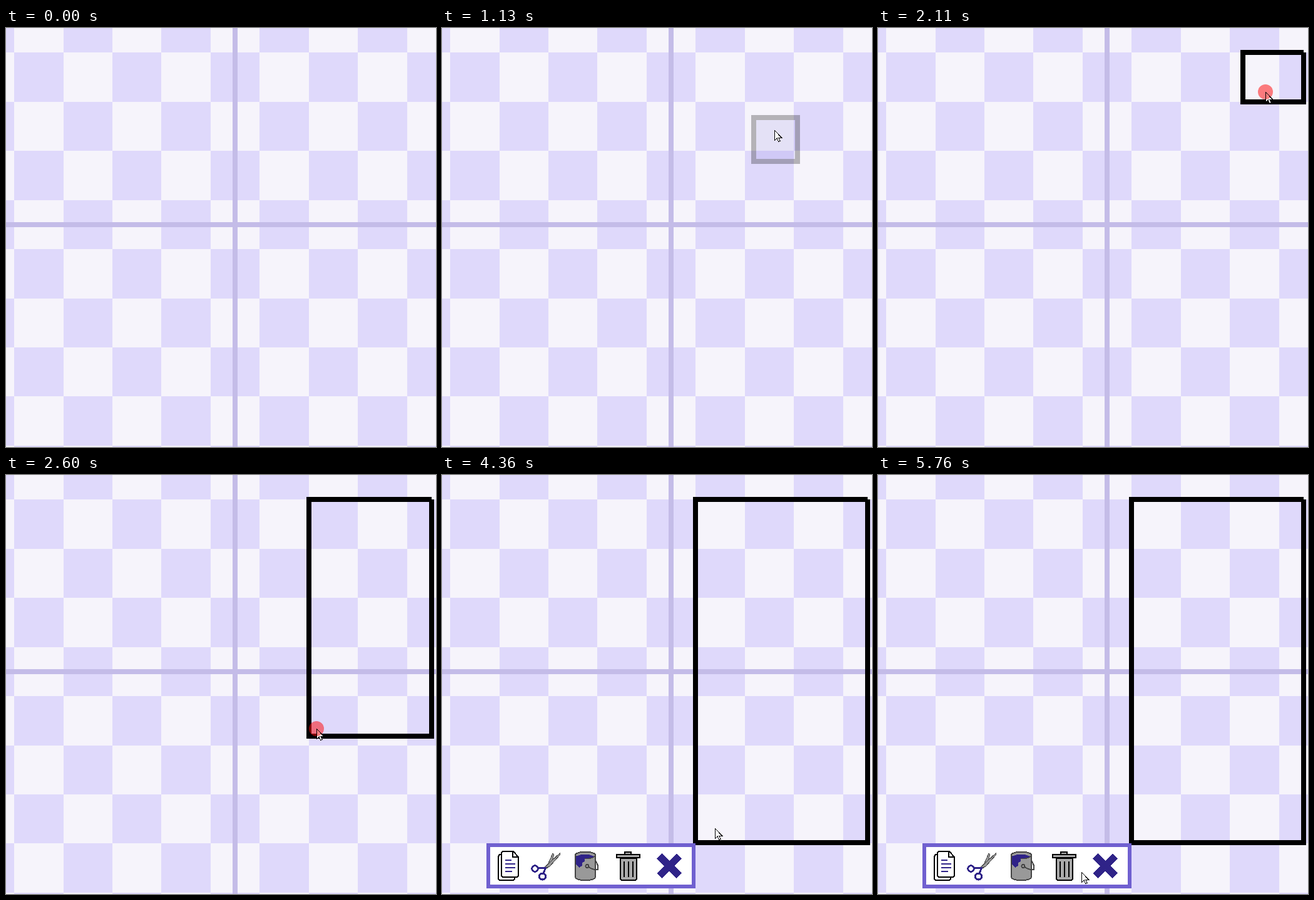
Write an HTML page that moves like this. It is 687 px wide and 669 px high and loops after 6890 ms.

```html
<!DOCTYPE html>
<html lang="en">
<head>
<meta charset="utf-8">
<title>Grid selection</title>
<style>
  html, body { margin: 0; width: 100%; height: 100%; overflow: hidden; background: #f6f4fb; }
  svg { display: block; width: 687px; height: 669px; }
</style>
</head>
<body>
<svg viewBox="0 0 687 669" xmlns="http://www.w3.org/2000/svg">
  <rect width="687" height="669" fill="#f6f4fb"/>
  <path id="checks" fill="#dfd9fb" shape-rendering="crispEdges"/>
  <path d="M362 0h8v669h-8zM0 310h687v8H0z" fill="#c4bce8"/>

  <g id="hover">
    <rect x="8" y="8" width="62" height="62" fill="#7060d0" fill-opacity=".13"/>
    <rect x="4" y="4" width="70" height="70" fill="none" stroke="#000" stroke-opacity=".27" stroke-width="8"/>
  </g>
  <path id="selection" fill="none" stroke="#000" stroke-width="7.85" shape-rendering="crispEdges"/>

  <g id="toolbar" shape-rendering="crispEdges">
    <rect x="74" y="591" width="328" height="66" fill="#fff" stroke="#7060d0" stroke-width="6"/>
    <!-- copy -->
    <g fill="#fff" stroke="#000" stroke-width="2">
      <path d="M95 606H92L90 609V645L92 647H114L116 645V641"/>
      <path d="M97 601H114L122 610V640L120 642H97L95 640V603Z"/>
      <path d="M113 601V610H122" fill="none"/>
      <path d="M101 615H111M101 621H117M101 627H117M101 633H112" stroke="#2f2388"/>
    </g>
    <!-- cut -->
    <g fill="#999" stroke="#444">
      <path d="M177 604L179 606L174 623L166 629Z"/>
      <path d="M188 604V607L172 625L162 628Z"/>
    </g>
    <g fill="none" stroke="#2f2388" stroke-width="3">
      <circle cx="148.5" cy="628.5" r="4.8"/>
      <circle cx="160.5" cy="641" r="5"/>
      <path d="M153 628L166 627M162 636L166 626"/>
    </g>
    <!-- fill -->
    <g stroke="#444" stroke-width="2" fill="none">
      <path d="M213 607V642Q214 647 229 647Q244 647 245 642V607" fill="#999"/>
      <ellipse cx="229" cy="607" rx="16" ry="5.5" fill="#999"/>
      <path d="M214 609Q229 602 243 609Q238 612 228 612V617L224 619V624L219 627L214 622Z" fill="#2f2388" stroke="none"/>
      <path d="M245 615Q251 625 249 630Q241 631 233 625"/>
      <circle cx="232" cy="624.5" r="2.5"/>
    </g>
    <!-- delete -->
    <g fill="#aaa" stroke="#000" stroke-width="2">
      <path d="M285 612V645L287 647H309L311 645V612Z"/>
      <path d="M292 606V602H302V606"/>
      <rect x="279" y="606" width="37" height="5"/>
      <path d="M291 617V642M298 617V642M305 617V642"/>
    </g>
    <!-- close -->
    <path d="M347.5 608.5L379 640M379 608.5L347.5 640" stroke="#2f2388" stroke-width="12"/>
  </g>

  <g id="cursor">
    <path d="M.5 .5V16.5L4.2 13L6.7 18.5L9 17.5L6.6 12H11.5Z" fill="#fff"/>
    <circle id="press" r="12" fill="#f00" fill-opacity=".5"/>
    <path d="M.5 .5V16.5L4.2 13L6.7 18.5L9 17.5L6.6 12H11.5Z" fill="none" stroke="#000" shape-rendering="crispEdges"/>
  </g>
</svg>
<script>
const LOOP = 6890, STEP = 70;
const ENTER = 650, PRESS = 1830, SETTLED = 3020, RELEASE = 3480, MENU = 3550, LEAVE = 4360;
const CELL = 78.45, RIGHT = 680, TOP = 39.3;
const LAG = 48, DT = 5;
const $ = id => document.getElementById(id);

const column = i => 13.05 + CELL * i;
const row = j => TOP + CELL * j;
const cellStart = (at, v) => at(Math.floor((v - at(0)) / CELL));

let checks = '';
for (let j = -1; j < 9; j++)
  for (let i = -1; i < 9; i++)
    if ((i + j) % 2 === 0) {
      const [x0, x1, y0, y1] = [column(i), column(i + 1), row(j), row(j + 1)].map(Math.round);
      checks += `M${x0} ${y0}H${x1}V${y1}H${x0}Z`;
    }
$('checks').setAttribute('d', checks);

// Mouse strokes as a few points: [time, x, y].
const dragStroke = [
  [650, 674, 368], [1130, 531, 163], [1270, 538, 100], [1760, 660, 72],
  [2040, 660, 88], [2110, 619, 102], [2670, 481, 442], [3020, 432, 557]
];
const menuStroke = [
  [4290, 440, 559], [4360, 436, 564], [4780, 180, 641],
  [5060, 92, 619], [5340, 192, 631], [5760, 325, 634]
];

// Smooth curve through the points, at rest at both ends.
function along(stroke, time) {
  const last = stroke.length - 1;
  const t = Math.min(Math.max(time, stroke[0][0]), stroke[last][0]);
  const i = Math.min(stroke.findLastIndex(point => point[0] <= t), last - 1);
  const slope = (n, axis) => n === 0 || n === last ? 0 :
    (stroke[n + 1][axis] - stroke[n - 1][axis]) / (stroke[n + 1][0] - stroke[n - 1][0]);
  const span = stroke[i + 1][0] - stroke[i][0], u = (t - stroke[i][0]) / span, v = 1 - u;
  return [1, 2].map(axis =>
    v * v * (1 + 2 * u) * stroke[i][axis] + u * u * (3 - 2 * u) * stroke[i + 1][axis] +
    span * u * v * (v * slope(i, axis) - u * slope(i + 1, axis)));
}

const cursorAt = t => along(t < RELEASE ? dragStroke : menuStroke, t);

function cellUnder([x, y]) {
  return [Math.min(cellStart(column, x), RIGHT - CELL), cellStart(row, y) + CELL];
}

// Left and bottom edges chase the cell under the cursor.
function boxAt(t) {
  let edges = cellUnder(cursorAt(ENTER));
  for (let s = ENTER; s < Math.min(t, SETTLED); s += DT) {
    const goal = cellUnder(cursorAt(s));
    edges = edges.map((edge, n) => {
      const gap = goal[n] - edge;
      return Math.abs(gap) < 1 ? goal[n] : edge + gap * (1 - Math.exp(-DT / LAG));
    });
  }
  return edges;
}

// Motion advances in fixed ticks, restarted after each pause.
function tick(t) {
  const base = [LEAVE, RELEASE, 640, 0].find(start => t >= start);
  return base + Math.floor((t - base) / STEP) * STEP;
}

const show = (id, visible) => $(id).setAttribute('visibility', visible ? 'visible' : 'hidden');
const place = (id, x, y) =>
  $(id).setAttribute('transform', `translate(${Math.round(x)} ${Math.round(y)})`);

function render(time) {
  const t = tick(time);
  const [left, bottom] = boxAt(t);
  place('cursor', ...cursorAt(t));
  place('hover', left, bottom - CELL);
  $('selection').setAttribute('d', `M${RIGHT} ${TOP}H${left}V${bottom}H${RIGHT}V${TOP}`);
  show('cursor', time >= ENTER);
  show('hover', time >= ENTER && t < PRESS);
  show('selection', t >= PRESS);
  show('press', t >= PRESS && t < RELEASE);
  show('toolbar', t >= MENU);
}

const start = performance.now();
function frame() {
  render((performance.now() - start) % LOOP);
  requestAnimationFrame(frame);
}
frame();
</script>
</body>
</html>
```
